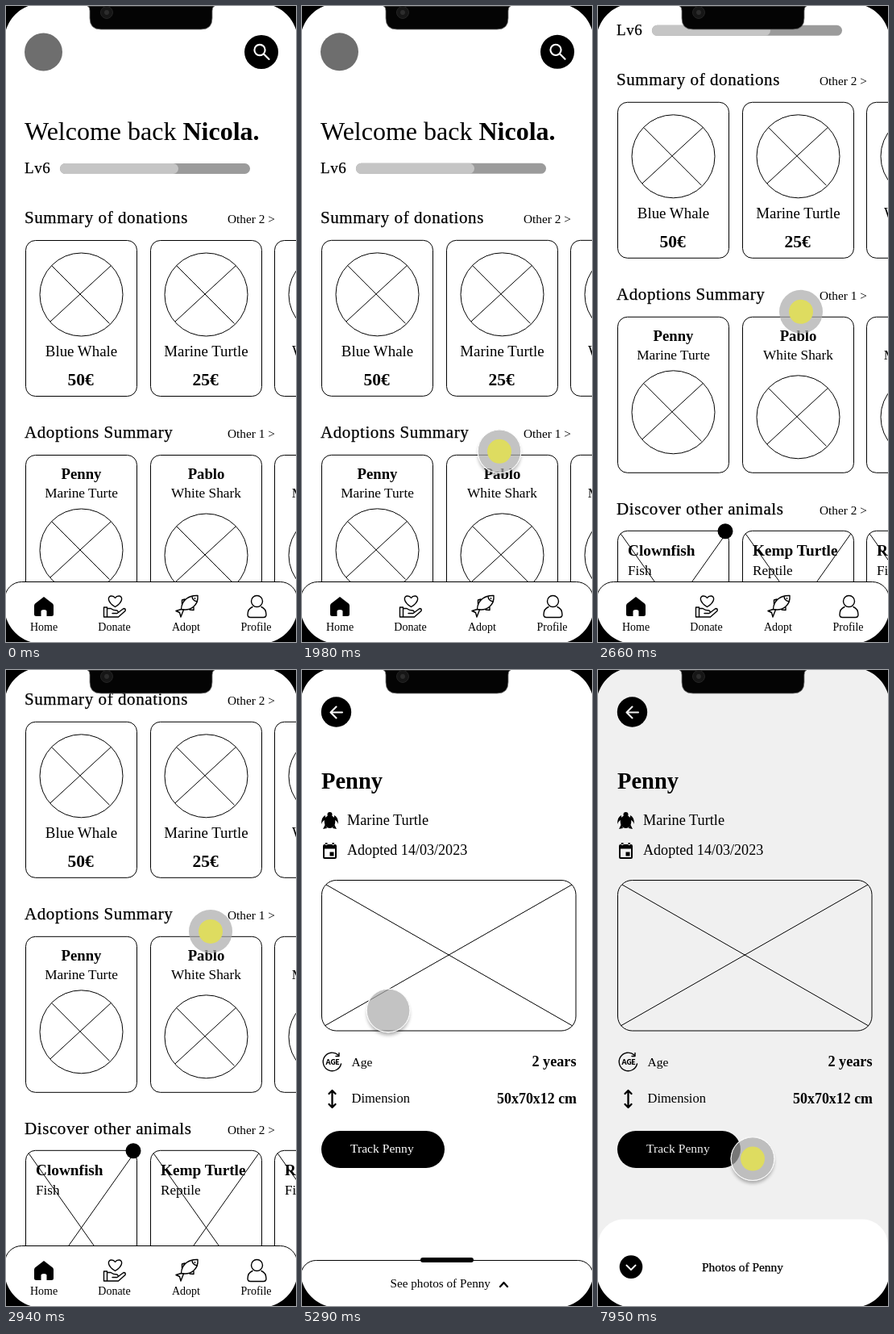
Write an HTML page that moves like this. It is 360 px wide and 788 px high and loops after 8000 ms.

```html
<!DOCTYPE html>
<html lang="en">
<head>
<meta charset="utf-8">
<title>Animal adoption app</title>
<style>
  html, body { margin: 0; width: 100%; height: 100%; overflow: hidden; background: #000; }
  svg { display: block; width: 100%; height: 100%; }
  text { font-family: "Liberation Serif", "Noto Serif", serif; }
  .b { font-weight: 700; }
  .h { font-size: 21px; letter-spacing: .58px; stroke: #000; stroke-width: .25px; }
  .mid { text-anchor: middle; }
  .end { text-anchor: end; }
  .line { fill: none; stroke: #000; stroke-width: 1; }
  .box { fill: #fff; stroke: #000; stroke-width: 1; }
  .icon { fill: none; stroke: #000; stroke-width: 1.4; stroke-linejoin: round; stroke-linecap: round; }
  .bold { stroke-width: 2.3; }
  .white { fill: none; stroke: #fff; stroke-width: 2.1; stroke-linecap: round; stroke-linejoin: round; }
</style>
</head>
<body>
<svg viewBox="0 0 360 788" preserveAspectRatio="none">
  <defs>
    <filter id="blur" x="-50%" y="-50%" width="200%" height="200%"><feGaussianBlur stdDeviation="2"/></filter>
    <clipPath id="outside">
      <path clip-rule="evenodd" d="M-50 -50H50V50H-50ZM-27 0A27 27 0 1 0 27 0A27 27 0 1 0 -27 0Z"/>
    </clipPath>
  </defs>
  <rect width="360" height="788" fill="#fff"/>

  <g id="home">
    <g id="page">
      <circle cx="46.5" cy="57" r="23.5" fill="#6e6e6e"/>
      <circle cx="317" cy="57" r="21"/>
      <circle class="white" cx="315" cy="54.5" r="6.6"/>
      <path class="white" d="M320 59.5L326.5 66"/>
      <text x="23" y="166" font-size="32">Welcome back <tspan class="b">Nicola.</tspan></text>
      <text class="h" x="23" y="207" style="font-size:19px">Lv6</text>
      <rect x="67" y="195" width="236" height="13" rx="6.5" fill="#9b9b9b"/>
      <rect x="67" y="195" width="147" height="13" rx="6.5" fill="#c5c5c5"/>
    </g>
    <g id="nav">
      <rect class="box" x="-1.5" y="713.5" width="363" height="100" rx="21"/>
      <path d="M47 732L58 740.5Q59 741.5 59 743V753.5Q59 756 56.5 756H50.5V750Q50.5 748 47 748T43.5 750V756H37.5Q35 756 35 753.5V743Q35 741.5 36 740.5Z"/>
      <g class="icon">
        <path d="M135.5 744.5C125 738 126 731 131 731Q134 731 135.5 733.5Q137 731 140 731C145 731 146 738 135.5 744.5Z"/>
        <path d="M121.5 745H125.5V757H121.5ZM125.5 746.5H130Q133 749 138 749Q140.500 751 138 752.500H132M140 751L146 746.5Q149 746.500 148 749.5L139.5 757H125.5"/>
        <path d="M238 730.5C227 730 218 736 217.5 747.5C230 750 239 742 238 730.5ZM217.5 747.5L211 749.5L215.500 751.5L217 757L220.500 748M231 731Q231 737 237.500 738M222 735L218.5 736L218.500 741M233 744L233 748.5L228 748"/>
        <circle cx="311.5" cy="737.5" r="7"/>
        <path d="M306 744.5Q300 747 300 754Q300 757.500 303.500 757.5H319.5Q323 757.500 323 754Q323 747 317 744.5"/>
      </g>
      <circle cx="234.500" cy="734" r=".9"/>
    </g>
  </g>

  <g id="detail">
    <g id="info">
      <circle cx="42.5" cy="52" r="18.7"/>
      <path class="white" d="M50 52.5H36M42.5 45.5L35.5 52.5L42.5 59.5"/>
      <text class="b" x="24" y="147" font-size="28.5">Penny</text>
      <ellipse cx="34.5" cy="188" rx="6.8" ry="8"/>
      <circle cx="34.5" cy="179" r="3"/>
      <path d="M29 180Q24 182 24 191Q26 186 29 186ZM40 180Q45 182 45 191Q43 186 40 186ZM29 191L26 197L31 196ZM40 191L43 197L38 196Z"/>
      <path fill-rule="evenodd" d="M28 216H41Q43 216 43 218V232Q43 234 41 234H28Q26 234 26 232V218Q26 216 28 216ZM28 221.5V232H41V221.5ZM29 214H31.5V217H29ZM37.5 214H40V217H37.5ZM34.5 225.5H39.5V230.5H34.5Z"/>
      <rect class="line" x="24.5" y="260.5" width="315.5" height="186.5" rx="18"/>
      <path class="line" d="M30 266L336 441M335 266L28 441"/>
      <path class="icon" d="M45 477A11.3 11.3 0 1 0 48.5 488M46 474.5V478.5H42"/>
      <text class="mid" x="38" y="488.7" font-size="8.5" style="font-family:Lato,sans-serif;font-weight:900">AGE</text>
      <path class="icon bold" d="M37.5 523V540M33.5 525L37.5 521L41.5 525M33.5 538L37.5 542L41.5 538"/>
      <rect x="24" y="571" width="153" height="46" rx="23"/>
      <rect class="box" x="-1.5" y="731.5" width="363" height="90" rx="19"/>
      <rect x="147" y="728" width="66" height="6" rx="3"/>
      <path class="icon bold" d="M246 764L250.5 759L255 764"/>
    </g>
    <rect id="dim" width="360" height="788"/>
    <g id="sheet">
      <rect x="0" y="681" width="360" height="300" rx="32" fill="#fff"/>
      <circle cx="41" cy="740" r="14.3"/>
      <path class="white" d="M35.5 738L41 743.5L46.5 738"/>
      <text class="h" x="129" y="745" style="font-size:15.4px;letter-spacing:0">Photos of Penny</text>
    </g>
  </g>

  <g id="cursor">
    <g id="shadow" clip-path="url(#outside)">
      <circle cy="4" r="26.5" opacity=".3" filter="url(#blur)"/>
      <circle r="27.5" fill="#fff"/>
    </g>
    <circle r="27" fill="#aaa" fill-opacity=".7"/>
    <circle id="ring" r="26.8" fill="none" stroke="#fff"/>
    <circle id="dot" r="15" fill="#dedc60"/>
  </g>

  <path fill-rule="evenodd" d="M0 0H360V788H0ZM-2 43V744A46 46 0 0 0 44 790H316A46 46 0 0 0 362 744V43A46 46 0 0 0 316 -3H44A46 46 0 0 0 -2 43Z"/>
  <path d="M101 0Q104 1 104 6V15Q104 29 118 29H242Q256 29 256 15V6Q256 1 259 0Z" fill="#040404" stroke="#777" stroke-width=".8"/>
  <circle cx="125" cy="8" r="7.5" fill="#161616" stroke="#242424"/>
  <circle cx="125" cy="8" r="3" fill="#2c2c2c"/>
</svg>

<script>
const NS = "http://www.w3.org/2000/svg";
const $ = id => document.getElementById(id);

function add(parent, tag, attrs, label) {
  const el = document.createElementNS(NS, tag);
  for (const k in attrs) el.setAttribute(k, attrs[k]);
  if (label) el.textContent = label;
  parent.appendChild(el);
}
const text = (parent, x, y, size, label, cls = "") =>
  add(parent, "text", { x, y, "font-size": size, class: cls }, label);

const page = $("page"), info = $("info");
const cardX = [24.5, 179.5, 333.5];

function section(y, title, more) {
  text(page, 23, y, 21, title, "h");
  text(page, 275, y, 15.3, more);
}
function card(x, y, h) {
  add(page, "rect", { class: "box", x, y, width: 138, height: h, rx: 12 });
}
// The two strokes of the cross sit slightly left of the circle's centre
function crossed(cx, cy) {
  add(page, "circle", { class: "line", cx, cy, r: 51.5 });
  add(page, "path", { class: "line", transform: `translate(${cx} ${cy})`,
    d: "M-36.5 -35.5L35 36M-38.5 33.5L36.5 -35.5" });
}

section(269, "Summary of donations", "Other 2 >");
[["Blue Whale", "50€"], ["Marine Turtle", "25€"], ["White Shark", "20€"]].forEach(([name, sum], i) => {
  const x = cardX[i], cx = x + 69;
  card(x, 290.5, 193);
  crossed(cx, 357.5);
  text(page, cx, 434, 18.9, name, "mid");
  text(page, cx - 1, 470, 21.5, sum, "mid b");
});

section(535, "Adoptions Summary", "Other 1 >");
[["Penny", "Marine Turte", 674.5], ["Pablo", "White Shark", 680.5], ["Luna", "Marine Turtle", 680.5]].forEach(([name, kind, cy], i) => {
  const x = cardX[i], cx = x + 69;
  card(x, 556.5, 193);
  crossed(cx, cy);
  text(page, cx, 586, 18.7, name, "mid b");
  text(page, cx, 609, 17.3, kind, "mid");
});

section(801, "Discover other animals", "Other 2 >");
[["Clownfish", "Fish"], ["Kemp Turtle", "Reptile"], ["Red Snapper", "Fish"]].forEach(([name, kind], i) => {
  const x = cardX[i];
  card(x, 821.5, 191);
  add(page, "path", { class: "line",
    d: `M${x + 4} 825.5L${x + 134} 1009M${x + 134} 825.5L${x + 4} 1009` });
  text(page, x + 12.5, 852, 19.3, name, "b");
  text(page, x + 12.5, 876, 17.2, kind);
});
add(page, "circle", { cx: 158, cy: 822, r: 9.5 });

[["Home", 47], ["Donate", 134.5], ["Adopt", 223.5], ["Profile", 310.5]].forEach(([label, x]) =>
  text($("nav"), x, 774, 14, label, "mid"));

text(info, 56, 191.5, 18.3, "Marine Turtle");
text(info, 56, 229, 18.1, "Adopted 14/03/2023");
text(info, 61.5, 490.5, 15.6, "Age");
text(info, 61.5, 536, 16.5, "Dimension");
text(info, 340.5, 491, 18.2, "2 years", "end b");
text(info, 341, 537, 17.9, "50x70x12 cm", "end b");
add(info, "text", { x: 60, y: 598, "font-size": 15.6, fill: "#fff" }, "Track Penny");
text(info, 109.5, 764.5, 15.2, "See photos of Penny");

const LOOP = 8000;
// time, x, y, ease into this point
const path = [
  [0, 400, 735], [120, 392, 730], [190, 368, 711], [460, 338, 638], [660, 338, 638],
  [1370, 264, 552, 1], [1500, 264, 552], [1690, 245, 552, 1], [1980, 245, 552],
  [2070, 246, 538], [2380, 249, 439], [2660, 252, 379], [2940, 254, 324], [3080, 256, 308],
  [3220, 256, 308], [3890, 104, 418, 1], [5230, 104, 418], [5890, 232, 581, 1],
  [6040, 232, 581], [6140, 228, 598], [6300, 213, 667], [6500, 200, 710], [6850, 192, 733],
  [7550, 192, 733], [7670, 192, 711], [7950, 192, 606], [8000, 192, 587]
];
const scroll = [
  [0, 0], [1980, 0], [2070, 14], [2380, 111], [2660, 171], [2940, 226], [3080, 251], [LOOP, 251]
];
// press intervals
const presses = [[1900, 3080], [4680, 4830], [6900, LOOP]];

function at(keys, t, col) {
  let i = 1;
  while (i < keys.length - 1 && keys[i][0] <= t) i++;
  const a = keys[i - 1], b = keys[i];
  let u = Math.min(1, Math.max(0, (t - a[0]) / (b[0] - a[0])));
  if (b[3]) u = u * u * (3 - 2 * u);
  return a[col] + (b[col] - a[col]) * u;
}

function draw(t) {
  const x = at(path, t, 1), y = at(path, t, 2);
  const onHome = t < 4830;
  $("home").style.display = onHome ? "" : "none";
  $("detail").style.display = onHome ? "none" : "";
  page.setAttribute("transform", `translate(0 ${-at(scroll, t, 1)})`);

  // The sheet follows the drag after a short threshold
  const pull = t > 7500 ? Math.max(0, 733 - y - 20) : 0;
  $("sheet").setAttribute("transform", `translate(0 ${107 - pull})`);
  $("dim").setAttribute("opacity", pull / 107 * 0.059);

  $("cursor").setAttribute("transform", `translate(${x} ${y})`);
  const press = presses.find(([from, to]) => t >= from && t < to);
  $("dot").setAttribute("opacity", press ? Math.min(1, (t - press[0]) / 60 + 0.2) : 0);
  const flat = t > 2040 && t < 3080;
  $("shadow").style.display = $("ring").style.display = flat ? "none" : "";
}

const start = performance.now();
function tick() {
  draw((performance.now() - start) % LOOP);
  requestAnimationFrame(tick);
}
tick();
</script>
</body>
</html>
```
